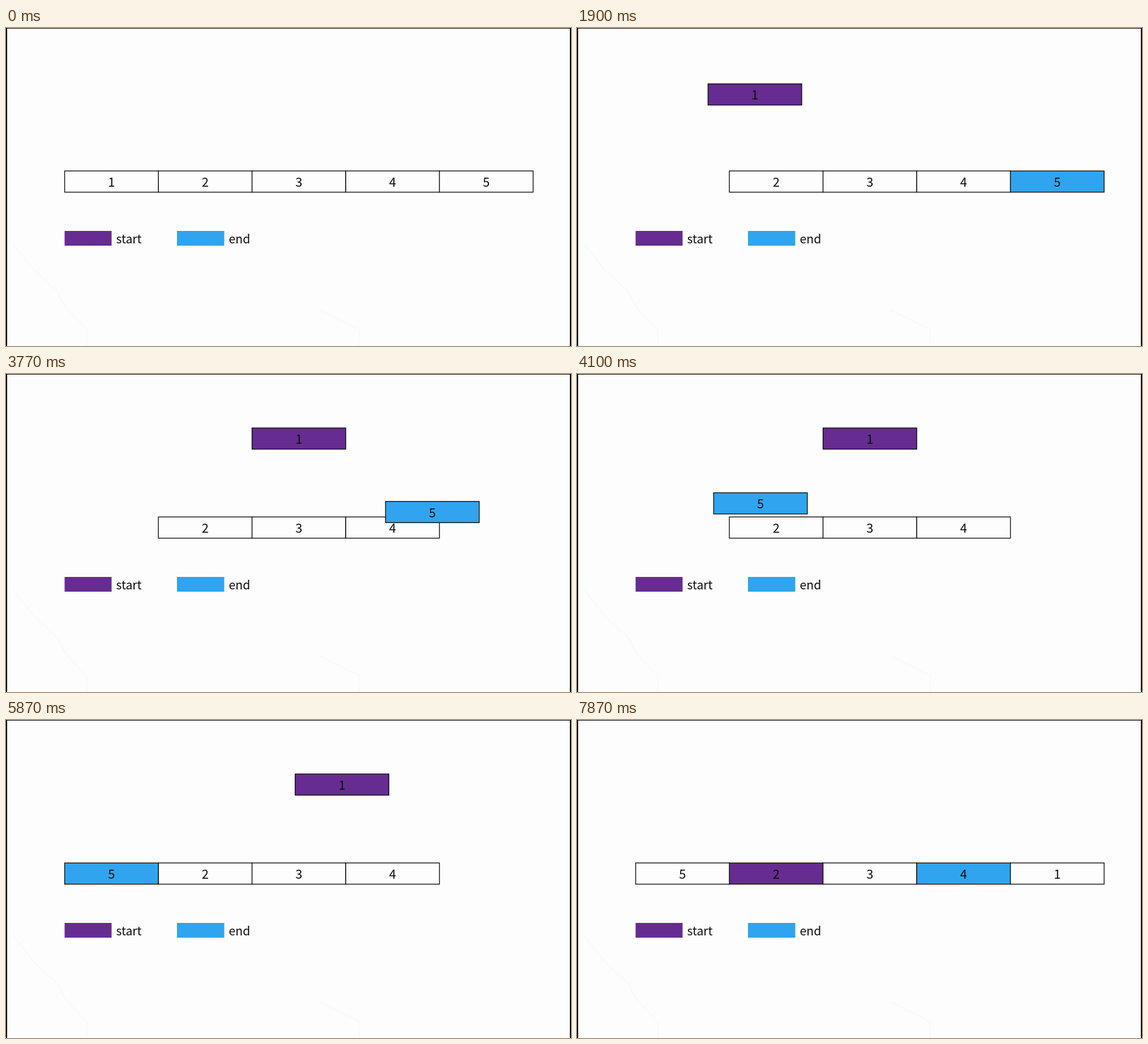
Recreate the animation shown at these times as an HTML page. Size 998 by 561 pixels, loop 8 s.

```html
<!DOCTYPE html>
<html lang="en">
<head>
<meta charset="utf-8">
<title>Swapping the ends of an array</title>
<style>
  html, body { margin: 0; width: 100%; height: 100%; overflow: hidden; background: #fdfdfd; }
  svg { display: block; width: 100%; height: 100%; }
  text { font-family: "Noto Sans CJK SC", "Noto Sans CJK JP", "Noto Sans CJK", "Noto Sans", sans-serif; fill: #0c0c0c; }
  .cell rect { stroke: #0c0c0c; stroke-width: 1.4; }
  .cell text { font-size: 22px; text-anchor: middle; }
  .legend { font-size: 21.2px; }
  .faint { fill: none; stroke: #f5f5f5; stroke-width: 1; }
</style>
</head>
<body>
<svg id="stage" viewBox="0 0 998 561">
  <rect width="998" height="561" fill="#fdfdfd"/>
  <path class="faint" d="M12 380L50 428L91 465L104 492L143 533V561M553 497L624 532V561"/>
  <path d="M0 0H998V561H996V1H2V561H0Z" fill="#000"/>
  <rect x="103.5" y="358" width="83" height="26" fill="#662c91"/>
  <rect x="302" y="358" width="83.5" height="26" fill="#30a4ee"/>
  <text class="legend" x="194.5" y="379.5">start</text>
  <text class="legend" x="393.5" y="379.5">end</text>
  <g id="cells"></g>
</svg>
<script>
const NS = 'http://www.w3.org/2000/svg';
const LOOP = 8000, MOVE = 970;
const LEFT = 103.6, TOP = 252.2, W = 165.5, H = 37.4;
const LIFT = 157, ARC = 71.3;
const WHITE = '#fdfdfd', PURPLE = '#662c91', BLUE = '#30a4ee';
const MARK_ENDS = 270, MARK_NEXT = 7500;

const make = (tag, attrs, parent) => {
  const el = document.createElementNS(NS, tag);
  for (const k in attrs) el.setAttribute(k, attrs[k]);
  if (parent) parent.appendChild(el);
  return el;
};

const layer = document.getElementById('cells');
// Cells 5 and 1 come last so that they pass over the others.
const cells = {};
for (const n of [2, 3, 4, 5, 1]) {
  const g = make('g', { class: 'cell' }, layer);
  const box = make('rect', { width: W, height: H }, g);
  make('text', { x: W / 2, y: 27.8 }, g).textContent = n;
  cells[n] = { g, box };
}

const track = (start, d) => {
  const path = make('path', { d });
  return { start, path, length: path.getTotalLength() };
};

// Offsets from each cell's home place.
const dx = 2 * W, up = -LIFT, span = -4 * W;
const sx = f => span * f / 0.25, sy = f => -ARC * f / 0.076;
const lift = track(1402,
  `M0 0V${up / 2}C0 ${up * 0.724} ${dx * 0.276} ${up} ${dx / 2} ${up}H${dx}`);
const arc = track(3475,
  `M0 0L${sx(0.069)} ${sy(0.056)}` +
  `C${sx(0.083)} ${sy(0.069)} ${sx(0.105)} ${sy(0.076)} ${sx(0.127)} ${sy(0.076)}` +
  `C${sx(0.152)} ${sy(0.076)} ${sx(0.172)} ${sy(0.069)} ${sx(0.186)} ${sy(0.056)}L${span} 0`);
const drop = track(5553,
  `M${dx} ${up}H${dx * 1.5}C${dx * 1.724} ${up} ${dx * 2} ${up * 0.724} ${dx * 2} ${up / 2}V0`);

const ease = p => p < 0.5 ? (2 * p) ** 2.5 / 2 : 1 - (2 - 2 * p) ** 2.5 / 2;

const along = ({ start, path, length }, t) => {
  const p = Math.min(1, Math.max(0, (t - start) / MOVE));
  return path.getPointAtLength(ease(p) * length);
};

const place = (n, offset, fill) => {
  const { g, box } = cells[n];
  g.setAttribute('transform',
    `translate(${LEFT + (n - 1) * W + offset.x} ${TOP + offset.y})`);
  box.setAttribute('fill', fill);
};

function draw(t) {
  const home = { x: 0, y: 0 };
  const ends = t >= MARK_ENDS && t < MARK_NEXT, next = t >= MARK_NEXT;
  place(1, along(t < drop.start ? lift : drop, t), ends ? PURPLE : WHITE);
  place(2, home, next ? PURPLE : WHITE);
  place(3, home, WHITE);
  place(4, home, next ? BLUE : WHITE);
  place(5, along(arc, t), ends ? BLUE : WHITE);
}

const began = performance.now();
function tick() {
  draw((performance.now() - began) % LOOP);
  requestAnimationFrame(tick);
}
tick();
</script>
</body>
</html>
```
